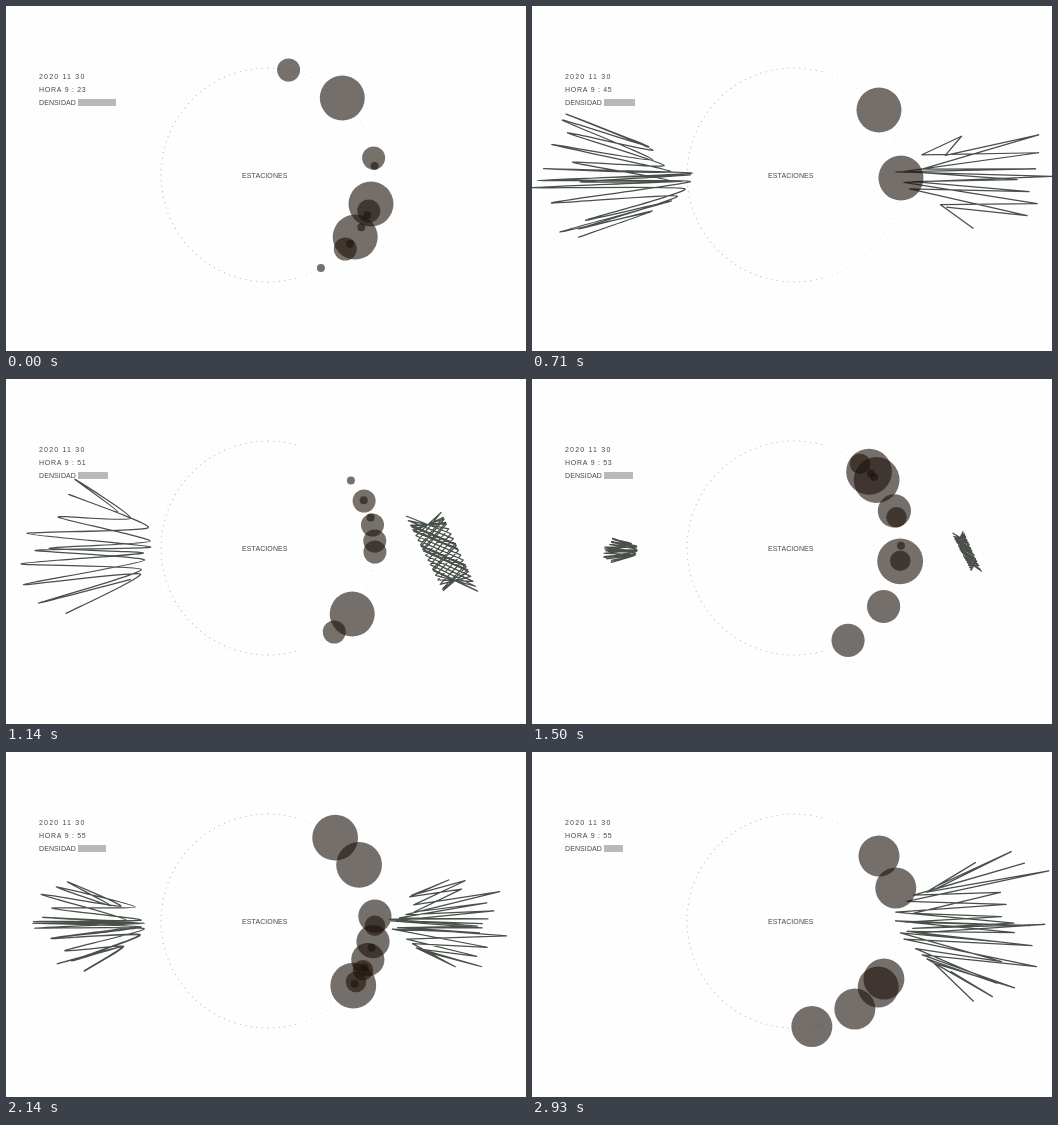
An HTML page with a canvas that plays this animation: 520 by 345 pixels, repeating every 3 s.

```html
<!DOCTYPE html>
<html lang="es">
<head>
<meta charset="utf-8">
<style>
  html, body { margin: 0; width: 100%; height: 100%; overflow: hidden; background: #fefefe; }
  canvas { display: block; width: 100%; height: 100%; }
</style>
</head>
<body>
<canvas id="stage" width="520" height="345"></canvas>
<script>
const ctx = document.getElementById("stage").getContext("2d");
const LOOP = 3000, STEPS = 42;
const LEFT = -1, RIGHT = 1;
const ring = { x: 262, y: 169, r: 107 };
const SMALL = 4, MEDIUM = 11.5, LARGE = 22.5, GROWTH = 6.3;

// Heights of the main stations on the ring; small ones are scattered by seed.
const poses = [
  { step: 0, large: [92, 198, 231], medium: [64, 152, 205, 243], small: 5 },
  { step: 6, large: [77, 97, 108, 157, 172, 218, 236] },
  { step: 10, large: [104, 172] },
  { step: 16, large: [235], medium: [122, 146, 162, 173, 253], small: 3 },
  { step: 26, large: [249], medium: [70, 113, 168, 208, 216, 239], small: 3 },
  { step: 35, large: [82, 87, 113, 142, 178, 239, 269, 275], size: 20, small: 5 },
  { step: 41, large: [104, 136, 227, 235, 257, 274.5], size: 20.5 }
];

const random = n => { const v = Math.sin(n * 127.1 + 11.7) * 43758.5453; return v - Math.floor(v); };
const mix = (a, b, u) => a + (b - a) * u;
const generate = (count, fn) => Array.from({ length: count }, (_, i) => fn(i));

// A zigzag sweeping down and back up, narrow next to the ring and wide at the stage edge.
function fan(side, y, spread, count, seed) {
  return generate(count, i => {
    const c = Math.cos(2 * Math.PI * i / (count - 1)), s = c * Math.abs(c);
    const jitter = random(seed + i), near = i % 2;
    const distance = near ? 100 + 32 * s * s + 25 * jitter : 275 - 40 * s * s - 70 * jitter;
    return [ring.x + side * distance, y + spread * s * (near ? 0.55 : 1) + 12 * (jitter - 0.5)];
  });
}

const weave = generate(44, i => {
  const turn = i * 0.29 % 2, along = Math.min(turn, 2 - turn), across = i % 2 ? 1 : -1;
  return [417 + 38 * along + 17 * across, 134 + 79 * along - 3 * across * (1 - along)];
});
const dash = side => generate(32, i => [ring.x + side * (i % 2 ? 165 : 179), 171 + i % 3]);
const [leftDash, rightDash] = [dash(LEFT), dash(RIGHT)];

const leftTrack = [
  [0, null], [6, fan(LEFT, 179, 62, 30, 3)], [10, fan(LEFT, 173, 61, 30, 40)],
  [16, fan(LEFT, 166, 69, 20, 80)], [22, null],
  [26, null], [29, fan(LEFT, 175, 65, 26, 120)], [32, null], [41, null]
];
const rightTrack = [
  [0, null], [6, fan(RIGHT, 173, 78, 40, 160)], [10, fan(RIGHT, 171, 48, 20, 200)],
  [16, weave], [26, rightDash], [29, fan(RIGHT, 172, 70, 34, 240)],
  [32, null], [35, null], [41, fan(RIGHT, 174, 72, 38, 280)]
];

function shapeAt(track, step, collapsed) {
  const next = Math.max(1, track.findIndex(([s]) => s >= step));
  const [[s0, a], [s1, b]] = [track[next - 1], track[next]];
  const u = (step - s0) / (s1 - s0);
  if ((!a && (!b || u === 0)) || (!b && u === 1)) return null;
  const from = a || collapsed, to = b || collapsed;
  const count = u === 1 ? to.length : Math.max(from.length, to.length);
  return generate(count, i => {
    const p = from[i % from.length], q = to[i % to.length];
    return [mix(p[0], q[0], u), mix(p[1], q[1], u)];
  });
}

function drawScribble(points, bend) {
  if (!points) return;
  const at = i => points[Math.max(0, Math.min(points.length - 1, i))];
  ctx.beginPath();
  ctx.moveTo(...points[0]);
  for (let i = 0; i < points.length - 1; i++) {
    const [p, q, r, s] = [at(i - 1), at(i), at(i + 1), at(i + 2)];
    ctx.bezierCurveTo(q[0] + (r[0] - p[0]) * bend, q[1] + (r[1] - p[1]) * bend,
                      r[0] - (s[0] - q[0]) * bend, r[1] - (s[1] - q[1]) * bend, r[0], r[1]);
  }
  ctx.strokeStyle = "rgba(28,36,28,.8)";
  ctx.lineWidth = 1.25;
  ctx.lineJoin = "round";
  ctx.stroke();
}

function disc(x, y, r, color) {
  ctx.fillStyle = color;
  ctx.beginPath();
  ctx.arc(x, y, r, 0, 2 * Math.PI);
  ctx.fill();
}

function drawStation(y, r) {
  if (r < 2 || r > LARGE + 1) return;
  const x = ring.x + Math.sqrt(ring.r ** 2 - (y - ring.y) ** 2);
  disc(x, y, r, "rgba(28,18,10,.6)");
}

function drawStations(step) {
  for (const { step: peak, large, medium = [], small = 0, size = LARGE } of poses) {
    const grown = GROWTH * (step - peak);
    large.forEach(y => drawStation(y, size + grown));
    medium.forEach(y => drawStation(y, MEDIUM + grown));
    for (let k = 0; k < small; k++) drawStation(75 + 190 * random(peak + k * 7), SMALL + grown);
  }
  // Short-lived stations fill the stretches between the main groups.
  for (let birth = 1; birth < STEPS - 4; birth++) {
    const age = step - birth;
    if (age < 0 || age > 3 || poses.some(p => p.step >= birth && p.step <= birth + 3)) continue;
    for (let k = 0; k < 3; k++) drawStation(70 + 200 * random(birth * 3 + k), SMALL + GROWTH * age);
  }
}

function drawRing() {
  for (let i = 0; i < 120; i++) {
    const a = i * Math.PI / 60;
    const color = Math.cos(a) > 0.3 ? "rgba(130,130,150,.15)" : "rgba(130,130,150,.5)";
    disc(ring.x + ring.r * Math.cos(a), ring.y + ring.r * Math.sin(a), 0.65, color);
  }
}

function label(text, x, y, spacing) {
  ctx.font = '7px "Liberation Sans", Arial, sans-serif';
  ctx.letterSpacing = spacing + "px";
  ctx.textBaseline = "middle";
  ctx.fillStyle = "#484848";
  ctx.fillText(text, x, y);
}

function draw(step) {
  const minute = Math.floor(55.5 - 32 * Math.exp(-((step / 9.2) ** 1.35)));
  const density = step === STEPS - 1 ? 19 : Math.round(28 + 10 * Math.exp(-step / 9));

  ctx.fillStyle = "#fefefe";
  ctx.fillRect(0, 0, 520, 345);
  drawRing();
  label("2020 11 30", 33, 71, 1.2);
  label("HORA 9 : " + minute, 33, 84, 0.7);
  label("DENSIDAD", 33, 97.5, 0.1);
  label("ESTACIONES", 236, 170.5, 0.1);
  ctx.fillStyle = "#b9b9b9";
  ctx.fillRect(72, 93, density, 7);
  drawScribble(shapeAt(leftTrack, step, leftDash), 0.1);
  drawScribble(shapeAt(rightTrack, step, rightDash), 0);
  drawStations(step);
}

function tick(now) {
  const t = now % LOOP;
  draw(Math.min(STEPS - 1, Math.floor((t + 5) * STEPS / LOOP)));
  requestAnimationFrame(tick);
}
draw(0);
requestAnimationFrame(tick);
</script>
</body>
</html>
```
